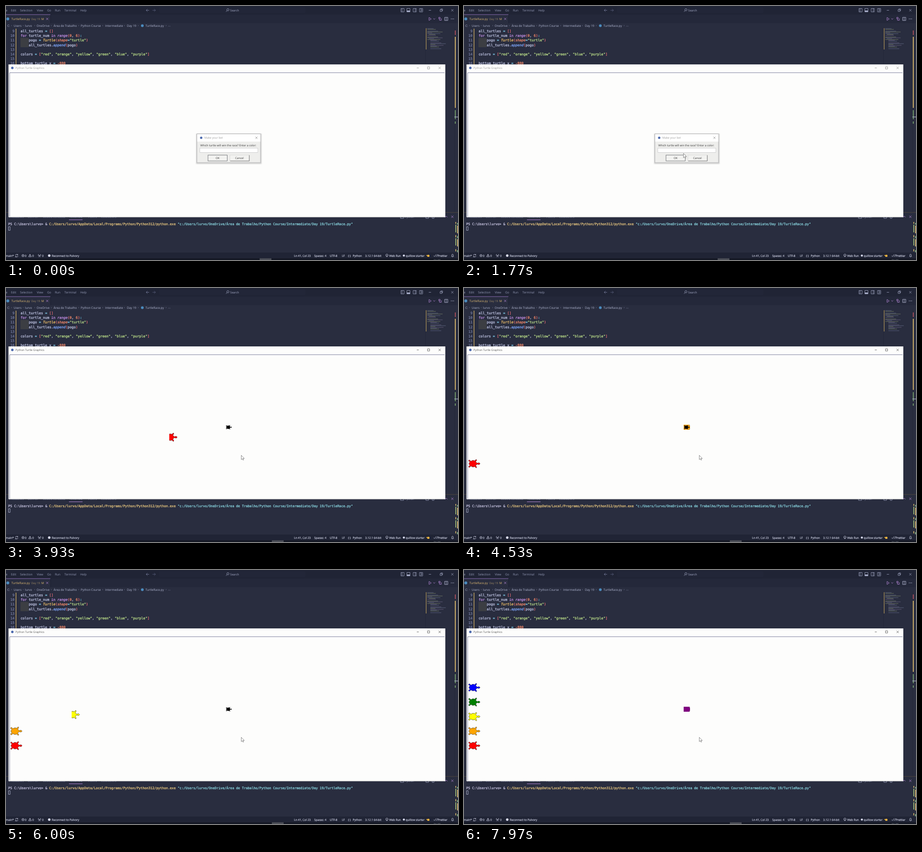
These frames come from a looping animation (998 by 561 pixels, 8 s). An HTML page:

```html
<!DOCTYPE html>
<html lang="en">
<head>
<meta charset="utf-8">
<title>Turtle race</title>
<style>
html, body { margin: 0; width: 100%; height: 100%; overflow: hidden; background: #292d3f; }
svg { display: block; width: 100vw; height: 100vh; }
text { font-family: "Open Sans", "Noto Sans", sans-serif; text-rendering: geometricPrecision; white-space: pre; }
.mono { font-family: "DejaVu Sans Mono", "Liberation Mono", monospace; }
</style>
</head>
<body>
<svg id="stage" viewBox="0 0 998 561" xmlns="http://www.w3.org/2000/svg"></svg>
<script>
const LOOP = 8000;
const CLOSE = 3500;                        // dialog closes
const START = 3714.5, CYCLE = 850.5, MOVE = 800;
const HOME = [490, 307.5];
const COLORS = ["red", "orange", "yellow", "green", "blue", "purple"];
const BACK = "#292d3f", BAR = "#202435";
const UI = "#a9afcb", DIM = "#7f86a6", PURPLE = "#c792ea", GOLD = "#e3bd73", BLUE = "#82aaff";
const stage = document.getElementById("stage");

const text = (x, y, s, fill = UI, size = 6.5, more = "") =>
  `<text x="${x}" y="${y}" fill="${fill}" font-size="${size}" ${more}>${s}</text>`;
const rect = (x, y, w, h, fill, more = "") =>
  `<rect x="${x}" y="${y}" width="${w}" height="${h}" fill="${fill}" ${more}/>`;
const line = (d, color = UI, w = 0.8) =>
  `<path d="${d}" fill="none" stroke="${color}" stroke-width="${w}"/>`;
const dot = (x, y, r, fill) => `<circle cx="${x}" cy="${y}" r="${r}" fill="${fill}"/>`;
const ring = (x, y, r, color = UI) =>
  `<circle cx="${x}" cy="${y}" r="${r}" fill="none" stroke="${color}" stroke-width=".8"/>`;
const box = (x, y, w, h, color = UI) => line(`M${x} ${y}h${w}v${h}h${-w}z`, color);
const cross = (x, y, r, color = UI) =>
  line(`M${x - r} ${y - r}l${2 * r} ${2 * r}m0 ${-2 * r}l${-2 * r} ${2 * r}`, color);

// Each part is [colour, string]; a leading "/" on the colour makes it italic.
function mono(x, y, size, parts) {
  const spans = parts.map(([c, s]) => {
    const color = c.replace("/", "");
    return `<tspan fill="${color}" stroke="${color}"${c[0] === "/" ? ' font-style="italic"' : ""}>${s}</tspan>`;
  });
  return `<text class="mono" x="${x}" y="${y}" font-size="${size}" stroke-width=".28">${spans.join("")}</text>`;
}

function titleBar() {
  const menu = [[-0.5, "e"], [11, "Edit"], [31, "Selection"], [68, "View"], [91, "Go"],
    [108, "Run"], [129, "Terminal"], [164, "Help"]];
  return rect(0, 0, 998, 19, BAR) +
    menu.map(([x, s]) => text(x, 11.8, s, "#979dba")).join("") +
    line("M316 9.5h-6.5m3-3l-3 3l3 3", DIM) + line("M323.5 9.5h6.5m-3-3l3 3l-3 3", "#5c6280") +
    rect(338, 3, 323, 13, "#222638", 'rx="2"') +
    ring(490, 8.3, 2.4) + line("M488.3 10l-2.5 2.7") + text(495, 11.8, "Search", UI, 6.2) +
    [872, 885, 899, 913].map(x => box(x, 5.5, 7, 7.5)).join("") +
    line("M874.5 5.5v7.5M903.5 5.5v7.5M916.5 5.5v7.5M916.5 9h3.5") + rect(885, 10, 7, 3, UI) +
    line("M933.5 9.5h5") + box(958.5, 8, 4, 4) + line("M960 8v-1.5h4v4h-1.5") + cross(985.5, 9.5, 2.3);
}

function tabs() {
  const path = [[3, "C:"], [17, "Users"], [42, "lurvo"], [67.5, "OneDrive"], [105, "Área de Trabalho"],
    [165, "Python Course"], [219, "Intermediate"], [267, "Day 19"], [308, "TurtleRace.py"]];
  const seps = [11.5, 37, 62.5, 99, 159.5, 212.5, 260.5, 291, 352.5];
  return rect(0, 19, 998, 19, "#24283a") + rect(0, 19, 98, 19, BACK) +
    rect(0, 18.5, 98, 1, "#8b6fb5") + rect(98, 19, 0.7, 19, "#1a1e2e") +
    dot(4, 28.5, 3.2, "#4b8bbe") +
    text(12, 30.9, "TurtleRace.py", GOLD) + text(56, 30.7, "Day 19", "#a08b66", 6) +
    text(78, 30.9, "M", GOLD, 6.4) + cross(91, 28.5, 2.3, PURPLE) +
    line("M934 25.3v6.6l5-3.3zM943.5 27.5l2 2l2-2", PURPLE) +
    line("M955.5 25h3v3h-3zM957 28v3.5h4M961 32v-5", PURPLE) + box(968.5, 25, 7, 7, "#c3c8e2") +
    line("M972 25v7", "#c3c8e2") + [983, 985.7, 988.4].map(x => dot(x, 28.5, 0.7, "#c3c8e2")).join("") +
    path.map(([x, s]) => text(x, 45.8, s, "#b3b9d4")).join("") + seps.map(x => text(x, 45.4, "›", DIM)).join("") +
    dot(301, 43.6, 3, "#4b8bbe") + text(358, 45.4, "...");
}

function code() {
  const v = "#c5cae9", op = "#89ddff", num = "#f78c6c", str = "#c3e88d", br = "#f07178", yl = "#ffcb6b";
  const list = COLORS.flatMap((c, i) => [[str, `"${c}"`], [v, i < 5 ? ", " : ""]]);
  const rows = [
    [[v, "all_turtles "], [op, "= "], [br, "[]"]],
    [[PURPLE, "for "], [v, "turtle_num "], [PURPLE, "in "], ["/" + PURPLE, "range"], [br, "("], [num, "0"],
      [v, ", "], [num, "6"], [br, ")"], [op, ":"]],
    [[v, "    pogo "], [op, "= "], ["/" + yl, "Turtle"], [br, "("], ["/" + num, "shape"], [op, "="],
      [str, '"turtle"'], [br, ")"]],
    [[v, "    all_turtles."], ["/" + BLUE, "append"], [br, "("], [v, "pogo"], [br, ")"]],
    [],
    [[v, "colors "], [op, "= "], [br, "["], ...list, [br, "]"]],
    [],
    [[v, "bottom_turtle_x "], [op, "= "], [num, "-880"]]
  ];
  return rect(32, 70.5, 18, 20.5, "#3c3e43") + rect(21.4, 50, 1.5, 80, "#c2a562") +
    rows.map((r, i) => {
      const y = 58.1 + i * 10.15, n = String(9 + i);
      return mono(18.8 - n.length * 4.52, y, 7.5, [["#737a9e", n]]) + mono(32.2, y, 7.5, r);
    }).join("");
}

function rulers() {
  let s = rect(927, 49, 1.2, 47, "#b99c5e");
  for (let i = 0; i < 25; i++) {
    const w = [14, 19, 0, 24, 34, 11, 29][i % 7], indent = i > 13 ? 7 : i % 5 === 2 ? 4 : 0;
    s += rect(930 + indent, 49.5 + i * 1.85, w, 0.8, ["#767f9e", "#95a078", "#827599"][i % 3], 'opacity=".75"');
  }
  s += rect(926, 48, 0.6, 80, BAR) + rect(990, 48, 0.5, 408, BAR);
  s += rect(991, 54, 2, 10, "#a84f5c") + rect(991, 68, 2, 157, "#d6b56a") +
    rect(991, 230, 2, 20, "#72996a") + rect(991, 255, 2, 5, "#72996a") + rect(990, 244.5, 8, 1.2, "#b6bcd4");
  [[477, 4], [483, 17], [506, 5], [513, 16], [537, 5]].forEach(([y, h], i) => {
    s += rect(992.2, y, 1.8, h, i % 2 ? "#9cbb78" : "#c9ad68") + rect(996, y + 2, 2, h, i % 2 ? "#c9ad68" : "#7aa779");
  });
  return s;
}

function terminal() {
  const heads = [[8, "PROBLEMS"], [48, "OUTPUT"], [82, "DEBUG CONSOLE"], [140, "TERMINAL"], [182, "PORTS"], [210, "COMMENTS"]];
  return rect(0, 455.5, 998, 1, "#51483f") +
    heads.map(([x, s]) => text(x, 468.2, s, DIM, 6)).join("") + rect(139, 471.7, 30, 0.9, PURPLE) +
    box(871, 463, 7, 6) + text(881, 468, "Python", UI, 6) + box(927, 463, 6, 6) + line("M940 464h6m-5 0v5h4v-5") +
    line("M969.5 466.5l2.5-2.5l2.5 2.5", PURPLE) + cross(985.5, 465.5, 2.3, PURPLE) +
    mono(5, 484.2, 7.15, [["#cfcbe8", "PS C:\\Users\\lurvo&gt; &amp; "],
      ["#ecca80", "C:/Users/lurvo/AppData/Local/Programs/Python/Python312/python.exe "],
      ["#8cdae4", '"c:/Users/lurvo/OneDrive/Área de Trabalho/Python Course/Intermediate/Day 19/TurtleRace.py"']]) +
    box(5.5, 487.5, 3.6, 8, "#c3c8e2");
}

function statusBar() {
  const c = "#d6d9ec", bold = `stroke="${c}" stroke-width=".15"`;
  const items = [[-0.5, "main*"], [41.5, "0"], [58, "0"], [79.5, "0"], [101, "Reconnect to Palvory"],
    [636, "Ln 41, Col 23"], [680.5, "Spaces: 4"], [715, "UTF-8"], [741.5, "LF"], [755, "{·}"], [765.5, "Python"],
    [793, "3.12.1 64-bit"], [846, "Web Run"], [882.5, "quillow starter"], [953, "Prettier"]];
  return rect(0, 544.5, 998, 13, BAR) + items.map(([x, s]) => text(x, 553.8, s, c, 6.2, bold)).join("") +
    line("M20.5 551a3 3 0 0 1 5.5-1.2m.5 2a3 3 0 0 1-5.5 1.2M26 547.8v2h-2M21 555v-2h2", c) +
    ring(37.5, 551.3, 2.5, c) + cross(37.5, 551.3, 1, c) + line("M53 548l3 5.8h-6zM53 550v2", c) +
    line("M74 550l-1.5 4.5m1.5-4.5l1.5 4.5M72 548a3 3 0 0 0 0 4m4-4a3 3 0 0 1 0 4", c) + dot(95.5, 551.3, 2.8, c) +
    ring(841, 550.5, 2.6, c) + line("M841 550.5v4", c) + dot(878.5, 551.3, 2.3, c) +
    rect(930, 549.5, 5, 4.5, "#f0b541", 'rx="1.5"') + rect(927.5, 550.2, 4, 1.4, "#f0b541", 'rx=".7"') +
    line("M944 551.5l2 2l4-5m-1 4l1 1l3-5", c) +
    line("M983.5 553h5l-1-1.3v-2a1.6 1.6 0 0 0-3.2 0v2zM985.3 554.3h1.4", c) +
    rect(0, 557.3, 998, 3.7, "#141824") + text(944, 564, "21:30", "#aab0bd", 6);
}

function raceWindow() {
  return rect(5.5, 129, 964.5, 337.5, "#fdfdfc") +
    dot(14, 136.7, 2.7, "#4a68ad") +
    `<g id="title">${text(21, 139.2, "Python Turtle Graphics", "currentColor", 6)}</g>` +
    `<g id="buttons">${line("M907 136.8h4.5", "currentColor")}${box(930.7, 134.5, 4.6, 4.6, "currentColor")}${cross(957.5, 136.8, 2.4, "currentColor")}</g>` +
    line("M8 465V147.3H968.5", "#777b9a", 1) + line("M8.6 465.2H968.5V148", "#e8e8e4", 0.7);
}

const SHELL = (() => {
  // One flank of the turtle, nose to tail, mirrored for the other.
  const side = [[14, 2], [10, 1], [7, 4], [9, 7], [8, 9], [5, 6], [1, 7], [-3, 5], [-6, 8], [-8, 6], [-5, 4]];
  return [[16, 0], ...side, [-7, 0], ...side.map(([x, y]) => [x, -y]).reverse()].join(" ");
})();
const shell = (scale, fill, stroke) =>
  `<polygon points="${SHELL}" transform="scale(${scale})" fill="${fill}" stroke="${stroke}" stroke-width=".6"/>`;

function dialog() {
  const button = (x, s, tx, edge) => rect(x, 329.2, 42.5, 13, "#f2f2f0", `stroke="${edge}" stroke-width=".8"`) +
    text(tx, 338, s, "#333", 6.1);
  return `<g id="dialog">` + rect(418.5, 281, 147, 69, "#777", 'opacity=".1" rx="3"') +
    rect(420, 281.5, 144, 67, "#777", 'opacity=".22" rx="2"') +
    rect(421.7, 282.7, 140.2, 63.2, "#eeeeec", 'stroke="#a3a3a6" stroke-width=".7"') + rect(422, 283, 139.5, 16.5, "#fff") +
    dot(431, 291, 2.6, "#4a68ad") + `<g id="dlgTitle">${text(438, 293.3, "Make your bet", "currentColor", 6.1)}</g>` +
    cross(553, 291, 2.4, "#888") + text(429, 310.2, "Which turtle will win the race? Enter a color:", "#333", 6.1) +
    rect(428, 314, 128, 9.5, "#fff", 'stroke="#b5b5b8" stroke-width=".6"') +
    `<text id="entry" x="430" y="321" font-size="6.1" fill="#222"></text>` + rect(0, 315.5, 0.6, 6.5, "#222", 'id="caret"') +
    button(446, "OK", 463, "#55595f") + button(494.5, "Cancel", 506, "#d8d8d8") +
    line("M495 342.3h42.2V329.5", "#666", 0.9) + "</g>";
}

stage.innerHTML =
  `<defs><clipPath id="front"><rect x="-.5" y="-12" width="30" height="24"/></clipPath>
   <clipPath id="patch"><rect x="-5" y="-5.5" width="14" height="11"/></clipPath></defs>` +
  rect(0, 0, 998, 561, BACK) + titleBar() + tabs() + code() + rulers() + terminal() + statusBar() +
  rect(560, 557.3, 26, 3.7, "#4b4e57", 'id="task"') + raceWindow() +
  COLORS.map((c, i) => `<g id="t${i}"><g id="c${i}">${shell(1.068, c, "#222")}</g></g>`).join("") +
  `<g id="waiting" transform="translate(${HOME})">${shell(0.534, "#000", "#000")}</g>` + dialog() +
  `<path id="cursor" d="M0 0v9.5l2.3-2l1.5 3.2l1.4-.6l-1.5-3.1h3z" fill="#fff" stroke="#555" stroke-width=".7"/>`;

const $ = id => document.getElementById(id);
const show = (id, on) => $(id).setAttribute("visibility", on ? "visible" : "hidden");
const TRACK = [[1400, 590, 410], [1767, 484.5, 325.5], [1900, 480, 317], [2450, 480, 317], [2850, 519.5, 369.5]];

function pointer(t) {
  const i = TRACK.findIndex(p => p[0] > t);
  if (i < 0) return TRACK[TRACK.length - 1].slice(1);
  if (i === 0) return TRACK[0].slice(1);
  const [a, b] = [TRACK[i - 1], TRACK[i]], k = (t - a[0]) / (b[0] - a[0]);
  return [1, 2].map(j => a[j] + (b[j] - a[j]) * k);
}

function draw(t) {
  const open = t < CLOSE, focused = t >= 2000;
  show("dialog", open);
  $("title").style.color = open ? "#999" : "#555";
  $("buttons").style.color = open ? "#888" : "#444";
  $("dlgTitle").style.color = focused ? "#555" : "#999";
  $("task").setAttribute("x", open ? 560 : 587);

  const typed = "red".slice(0, Math.max(0, Math.floor((t - 2600) / 160)));
  $("entry").textContent = typed;
  $("caret").setAttribute("x", 430.5 + typed.length * 3.1);
  show("caret", open && focused && Math.floor((t - 2000) / 530) % 2 === 0);

  COLORS.forEach((_, i) => {
    const since = t - START - i * CYCLE;
    const k = Math.min(1, Math.max(0, since / MOVE));
    const x = HOME[0] + (18.4 - HOME[0]) * k, y = HOME[1] + (388 - 32.1 * i - HOME[1]) * k;
    $("t" + i).setAttribute("transform", `translate(${x} ${y})`);
    $("c" + i).setAttribute("clip-path", k === 0 ? "url(#patch)" : k < 1 ? "url(#front)" : "none");
    show("t" + i, since >= MOVE - CYCLE);
  });
  show("waiting", !open && t < START + 5 * CYCLE + MOVE - CYCLE);

  show("cursor", t >= TRACK[0][0]);
  $("cursor").setAttribute("transform", `translate(${pointer(t)})`);
}

const begin = performance.now();
function tick() {
  const t = (performance.now() - begin) % LOOP;
  draw(Math.floor((t + 4) * 0.03) / 0.03);
  requestAnimationFrame(tick);
}
tick();
</script>
</body>
</html>
```
